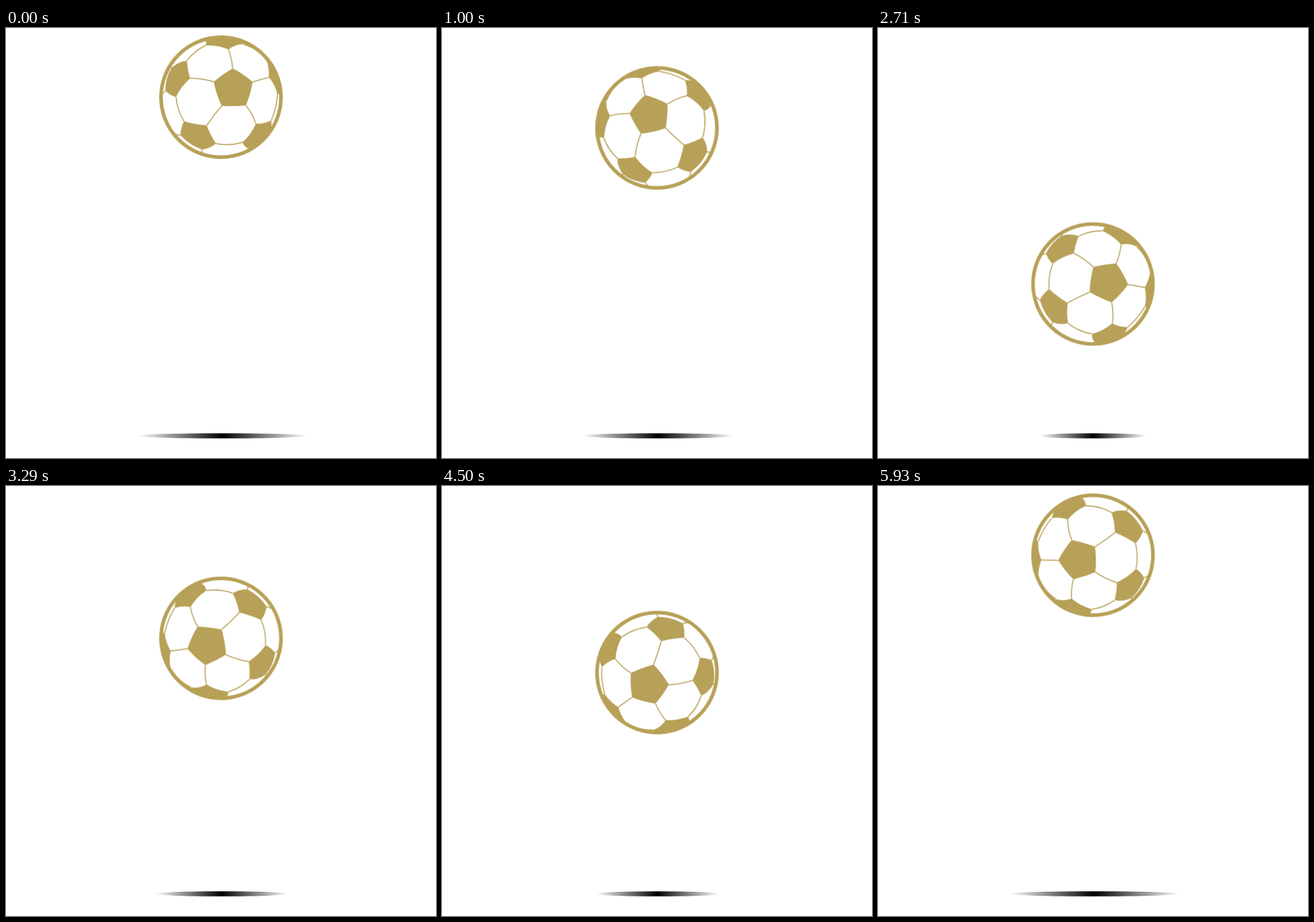
Recreate the animation shown at these times as an HTML page. Size 640 px wide and 640 px high, loop 6 s.

```html
<!DOCTYPE html>
<html lang="en">
<head>
<meta charset="utf-8">
<title>Bouncing ball</title>
<style>
  html, body { margin: 0; width: 100%; height: 100%; overflow: hidden; background: #fff; }
  svg { display: block; width: 100vw; height: 100vh; }
  .drop, .spin, .shadow { animation: 6s linear infinite; }
  .drop { animation-name: drop; animation-timing-function: cubic-bezier(.37, 0, .63, 1); }
  .spin { animation-name: spin; }
  .shadow { animation-name: shadow; transform-origin: 317px 607px; }

  @keyframes drop {
    0%, 18.93%, 37.95%, 59.33%, 80.1%, 98.83%, 100% { transform: translateY(0); }
    9.45%, 28.42%, 48.3%, 69.92%, 89.47% { transform: translateY(350px); }
  }
  @keyframes shadow {
    0%, 18.93%, 37.95%, 59.33%, 80.1%, 98.83%, 100% {
      transform: scaleX(1);
      animation-timing-function: cubic-bezier(.3, .06, .6, 1);
    }
    9.45%, 28.42%, 48.3%, 69.92%, 89.47% {
      transform: scaleX(.556);
      animation-timing-function: cubic-bezier(.4, 0, .75, .88);
    }
  }
  @keyframes spin {
    0% { transform: rotate(0deg); }
    16.67% { transform: rotate(275.6deg); }
    32.17% { transform: rotate(539.4deg); }
    45.17% { transform: rotate(746.5deg); }
    65.5% { transform: rotate(1087.2deg); }
    84.5% { transform: rotate(1394.5deg); }
    98.83% { transform: rotate(1637.3deg); }
    100% { transform: rotate(1656.7deg); }
  }
</style>
</head>
<body>
<svg viewBox="0 0 640 640">
  <defs>
    <linearGradient id="fade">
      <stop offset="0" stop-color="#000" stop-opacity="0"/>
      <stop offset=".5" stop-color="#000"/>
      <stop offset="1" stop-color="#000" stop-opacity="0"/>
    </linearGradient>
    <clipPath id="rim"><circle r="90"/></clipPath>
  </defs>

  <ellipse class="shadow" cx="322" cy="607" rx="127" ry="3.8" fill="url(#fade)"/>

  <g transform="translate(320 103)">
    <g class="drop">
      <g class="spin">
        <g clip-path="url(#rim)">
          <!-- patches -->
          <path fill="#b7a057" d="
            M17-43Q33-35 47-23Q44-4 37 12Q20 14 1 13Q-7-4-11-23Q2-34 17-43Z
            M-20-92Q-23-85-23-77Q-4-78 11-71Q20-79 33-79L29-85L20-92Z
            M67-57Q72-44 71-30Q80-20 84-5L92-5L80-60Z
            M-74-43Q-64-53-51-54Q-50-40-46-28Q-60-15-67 0Q-75-2-83-9Q-83-28-74-43Z
            M-55 36Q-37 41-21 42Q-16 56-7 69Q-17 77-28 78Q-46 72-60 57Q-60 46-55 36Z
            M52 39Q64 40 75 34Q76 42 74 50L63 63Q52 74 41 76Q36 75 32 67Q45 56 52 39Z"/>
          <!-- seams -->
          <path fill="none" stroke="#b7a057" stroke-width="1.5" d="
            M17-43Q16-58 11-71M47-23L71-30M37 12Q47 24 52 39M1 13Q-11 27-21 42M-11-23Q-28-28-46-28
            M-51-54Q-40-69-23-77M33-79Q56-72 68-55M-67 0Q-65 20-55 36M-7 69Q13 73 32 67M84-5Q83 16 75 34
            M-74-43L-75-48M-83-9L-88-4M-60 57L-69 55M-28 78L-28 88M41 76L38 81"/>
        </g>
        <circle r="89.3" fill="none" stroke="#b7a057" stroke-width="5.4"/>
      </g>
    </g>
  </g>
</svg>
</body>
</html>
```
